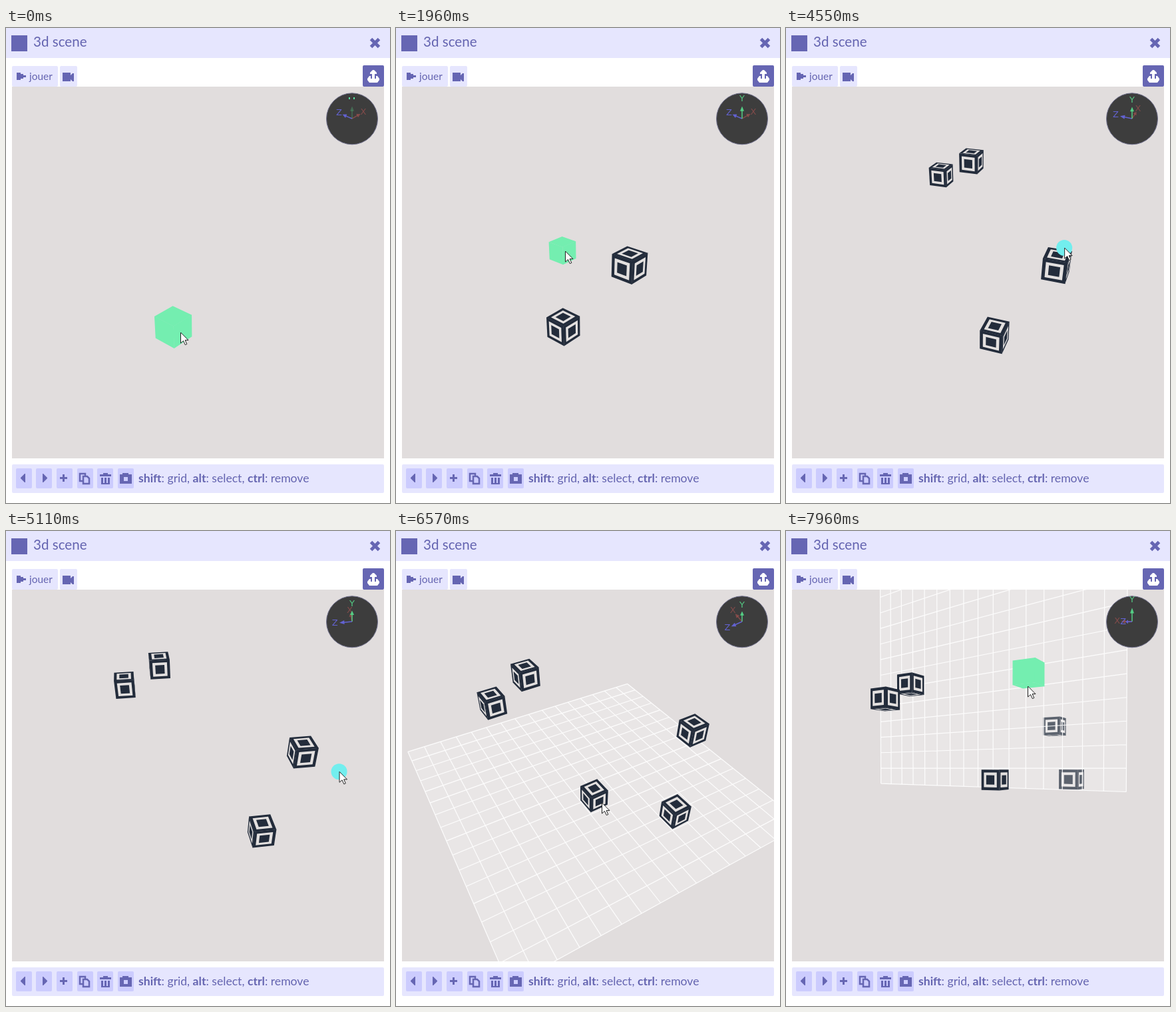
An HTML page with a canvas for the animation above (8000 ms loop, 577 by 713 pixels).

```html
<!DOCTYPE html>
<html lang="en">
<head>
<meta charset="utf-8">
<title>3d scene</title>
<style>
  html, body { margin: 0; width: 100%; height: 100%; overflow: hidden; background: #fff; }
  svg, canvas { position: absolute; left: 0; top: 0; width: 577px; height: 713px; }
  text { font-family: Lato, "Open Sans", sans-serif; fill: #6464b0; }
  .bar { fill: #e6e6fe; }
  .key { fill: #ccccfe; }
  .ink { fill: #6666b3; }
  .line { fill: none; stroke: #6666b3; stroke-width: 2.5; }
  .white { fill: #fff; }
</style>
</head>
<body>
<svg viewBox="0 0 577 713">
  <rect class="bar" width="577" height="45"/>
  <rect class="ink" x="8" y="11" width="24" height="24"/>
  <text x="41" y="28" font-size="20.6">3d scene</text>
  <path class="line" style="stroke-width:5" d="M548.5 16.500l12 12m0-12l-12 12"/>

  <rect class="bar" x="9" y="57" width="69" height="31" rx="2"/>
  <path class="ink" d="M16 67h6v2h4v2h4v3h-4v2h-4v2h-6z"/>
  <text x="35" y="77.500" font-size="15.4">jouer</text>
  <rect class="bar" x="81" y="57" width="26" height="31" rx="2"/>
  <path class="ink" d="M85 67h12v4l3-3h2v12h-2l-3-3v3h-12z"/>
  <rect class="ink" x="536" y="56" width="32" height="32" rx="2"/>
  <path class="white" d="M551 63h2l4 4v2h-3v7h2v-4h2l3 4v2l-3 4h-12l-3-4v-2l3-4h2v4h2v-7h-3v-2z"/>

  <rect class="bar" x="9" y="655" width="559" height="43" rx="2"/>
  <g id="keys"></g>
  <path class="ink" d="M22 675l6-6h1v13h-1l-6-6zM62 675l-6-6h-1v13h1l6-6z"/>
  <path class="ink" d="M85 670h3v4h4v3h-4v4h-3v-4h-4v-3h4z"/>
  <path class="line" d="M115 680h-4v-11h8v3M116 673h6l3 3v8h-9z"/>
  <path class="ink" d="M141 670h5v-2h7v2h5v3h-17zM143 675h3v10h-3zM148 675h3v10h-3zM153 675h3v10h-3zM143 683h13v2h-13z"/>
  <path class="ink" fill-rule="evenodd" d="M171 670h4v-2h9v2h5v14h-18zM177 674v6h6v-6z"/>
  <text x="199" y="681.500" font-size="17.6"><tspan font-weight="700">shift</tspan>: grid, <tspan font-weight="700">alt</tspan>: select, <tspan font-weight="700">ctrl</tspan>: remove</text>
</svg>
<canvas id="stage" width="577" height="713"></canvas>
<script>
const LOOP = 8000, FOCAL = 660, DIST = 24, RAD = Math.PI / 180, LATTICE = -41;
const ctx = document.getElementById('stage').getContext('2d');

document.getElementById('keys').innerHTML = [15, 45, 76, 107, 137, 168]
  .map(x => `<rect class="key" x="${x}" y="661" width="24" height="30" rx="2"/>`).join('');

// world points: [right, up, away] around the orbit target
const cubes = [
  { at: 900, p: [-1.1, -0.2, -4.95] },
  { at: 1460, p: [1.72, 2.9, -5] },
  { at: 2840, p: [-0.4, 3.95, 4.93] },
  { at: 3490, p: [1, 5, 3.6] },
  { at: 6490, p: [-1.2, -0.2, -0.7] }
];
const [c1, c2, c3, c4, c5] = cubes.map(c => c.p);

const grids = [
  { from: 240, to: 1700, p: [-1.45, -0.7, -0.7], angle: -45 },
  { from: 2200, to: 3970, p: [2.75, -0.7, 3.3], angle: -42 },
  { from: 5750, to: 6800, p: [0, -0.7, 0], angle: -43, floor: true },
  { from: 7640, to: 8000, p: [-0.4, -0.6, 0.07], angle: 42 }
];

// [time, yaw, pitch]
const orbit = [[0, 0, 27], [3970, 0, 27], [4550, 21, 32], [5590, 73, 42],
  [6850, 73, 42], [7320, 85, 21], [7640, 100, 1]];

// [time, x, y]
const pointer = [[0, 262, 457], [850, 262, 457], [1300, 362, 366], [1640, 362, 366],
  [1900, 254, 335], [2200, 254, 335], [2600, 288, 234], [2900, 288, 234],
  [3250, 326, 217], [3570, 337, 197], [3900, 362, 312], [4550, 418, 330],
  [5590, 571, 388], [5700, 571, 388], [5900, 389, 382], [6200, 389, 382],
  [6480, 309, 408], [6650, 309, 408], [6850, 318, 318], [7320, 352, 265],
  [7600, 390, 216], [7960, 363, 233]];

const far = [-1.57, -0.2, 3.4], side = [0.8, -0.2, -3.3];
const ghost = [[0, ...c1], [850, ...c1], [1300, ...c2], [1640, ...c2], [1900, ...far],
  [2200, ...far], [2600, ...c3], [2840, ...c3], [3300, ...c4], [5900, ...side],
  [6200, ...side], [6480, ...c5], [7640, -2.9, 3.6, -2], [7900, -2.9, 5, -2]];
const ghostOn = [[0, 1460], [1640, 3490], [5900, 6490], [7640, 8000]];
const dragOn = [[4000, 5600], [6880, 7600]];

const within = (spans, t) => spans.some(([a, b]) => t >= a && t < b);
const dot = (a, b) => a[0] * b[0] + a[1] * b[1] + a[2] * b[2];
const add = (p, v, k) => p.map((n, i) => n + v[i] * k);

function sample(keys, t) {
  let i = 0;
  while (i < keys.length - 1 && keys[i + 1][0] <= t) i++;
  const a = keys[i], b = keys[i + 1];
  if (!b) return a.slice(1);
  const k = (t - a[0]) / (b[0] - a[0]);
  return a.slice(1).map((v, n) => v + (b[n + 1] - v) * k);
}

let view;
function setView(yaw, pitch) {
  const s = Math.sin(pitch * RAD), c = Math.cos(pitch * RAD);
  view = { yaw, s, c, eye: [0, DIST * s, -DIST * c] };
}
function rotate([x, y, z]) {
  const c = Math.cos(view.yaw * RAD), s = Math.sin(view.yaw * RAD);
  return [x * c - z * s, y, x * s + z * c];
}
function axis(angle) {
  const r = (view.yaw + angle) * RAD;
  return [Math.cos(r), 0, Math.sin(r)];
}
const depth = p => DIST + p[2] * view.c - p[1] * view.s;
function project(p) {
  const k = FOCAL / depth(p);
  return [288.5 + p[0] * k, 367 - (p[1] * view.c + p[2] * view.s) * k];
}

function poly(points, color) {
  ctx.beginPath();
  points.forEach(([x, y]) => ctx.lineTo(x, y));
  ctx.closePath();
  ctx.fillStyle = color;
  ctx.fill();
}

function drawCube(c, half, flat) {
  const axes = [axis(LATTICE), [0, 1, 0], axis(LATTICE + 90)];
  axes.forEach((n, i) => [-1, 1].forEach(sign => {
    const mid = add(c, n, sign * half);
    if (dot(n, add(view.eye, mid, -1)) * sign <= 0) return;
    const u = axes[(i + 1) % 3], v = axes[(i + 2) % 3];
    const square = (k, color) => poly([[-1, -1], [1, -1], [1, 1], [-1, 1]]
      .map(([x, y]) => project(add(add(mid, u, x * k * half), v, y * k * half))), color);
    if (flat) return square(1.01, flat);
    square(1.01, '#232c3b');
    square(0.73, '#e3e0df');
    square(0.46, '#232c3b');
  }));
}

function drawGrid(g) {
  const c = rotate(g.p), u = axis(g.angle);
  const v = g.floor ? axis(g.angle + 90) : [0, 1, 0], low = g.floor ? -8 : 0;
  const at = (i, j) => project(add(add(c, u, i - 8), v, j + low));
  poly([at(0, 0), at(16, 0), at(16, 16), at(0, 16)], 'rgba(255,255,255,.26)');
  ctx.beginPath();
  for (let i = 0; i <= 16; i++) {
    ctx.moveTo(...at(i, 0)); ctx.lineTo(...at(i, 16));
    ctx.moveTo(...at(0, i)); ctx.lineTo(...at(16, i));
  }
  ctx.strokeStyle = 'rgba(255,255,255,.9)';
  ctx.lineWidth = 1.2;
  ctx.stroke();
}

function isBehind(p, g) {
  if (g.floor) return false;
  const c = rotate(g.p), n = axis(g.angle + 90);
  const facing = Math.sign(dot(n, add(view.eye, c, -1)));
  return dot(n, add(p, c, -1)) * facing < -0.6;
}

function drawGizmo(t) {
  const ox = 520, oy = 136;
  ctx.beginPath();
  ctx.arc(ox, oy + 0.3, 38.5, 0, 7);
  ctx.fillStyle = '#3d3d3d';
  ctx.fill();
  ctx.strokeStyle = '#6f6f8c';
  ctx.lineWidth = 1;
  ctx.stroke();
  const dimY = t < 1640 || (t > 2440 && t < 4300);
  const arms = [
    ['X', axis(LATTICE + 90), '#c85a58'],
    ['Y', [0, 1, 0], '#55d488'],
    ['Z', axis(LATTICE + 180), '#6464d8']
  ].sort((a, b) => b[1][2] - a[1][2]);
  ctx.font = '13px "DejaVu Sans", sans-serif';
  ctx.textAlign = 'center';
  ctx.textBaseline = 'middle';
  for (const [name, d, color] of arms) {
    const dx = d[0] * 26, dy = -(d[1] * view.c + d[2] * view.s) * 28;
    const len = Math.hypot(dx, dy) || 1, nx = -dy / len * 3, ny = dx / len * 3;
    const faded = name === 'Y' && dimY;
    ctx.globalAlpha = faded ? 0.3 : d[2] > 0.3 && name === 'X' ? 0.5 : 0.95;
    ctx.strokeStyle = ctx.fillStyle = color;
    ctx.lineWidth = 1.5;
    ctx.beginPath();
    ctx.moveTo(ox, oy);
    ctx.lineTo(ox + dx * 0.5, oy + dy * 0.5);
    ctx.stroke();
    const bx = ox + dx * 0.45, by = oy + dy * 0.45;
    poly([[bx + nx, by + ny], [bx - nx, by - ny], [ox + dx * 0.74, oy + dy * 0.74]], color);
    if (faded) {
      ctx.globalAlpha = 1;
      ctx.fillStyle = '#55e0a0';
      ctx.fillRect(515, 104, 2, 3);
      ctx.fillRect(522, 104, 2, 3);
    } else ctx.fillText(name, ox + dx, oy + dy - d[1] * 4);
  }
  ctx.globalAlpha = 1;
}

const arrow = new Path2D('M0 0V16L4 12.500L6.800 18.600L9.300 17.500L6.600 11.600H11.500Z');
function drawPointer(t) {
  const [x, y] = sample(pointer, t);
  if (within(dragOn, t)) {
    ctx.beginPath();
    ctx.arc(x, y, 12, 0, 7);
    ctx.fillStyle = '#72eeee';
    ctx.fill();
  }
  ctx.save();
  ctx.translate(x + 0.5, y);
  ctx.fillStyle = '#fff';
  ctx.strokeStyle = '#222';
  ctx.lineWidth = 1;
  ctx.fill(arrow);
  ctx.stroke(arrow);
  ctx.restore();
}

function draw(t) {
  setView(...sample(orbit, t));
  ctx.clearRect(0, 0, 577, 713);
  ctx.save();
  ctx.beginPath();
  ctx.rect(9, 88, 559, 558);
  ctx.clip();
  ctx.fillStyle = '#e1dddd';
  ctx.fillRect(9, 88, 559, 558);

  const items = cubes.filter(c => t >= c.at).map(c => ({ p: rotate(c.p), half: 0.52 }));
  if (within(ghostOn, t)) items.push({ p: rotate(sample(ghost, t)), half: 0.58, flat: '#74eeb0' });
  items.sort((a, b) => depth(b.p) - depth(a.p));
  const grid = grids.find(g => t >= g.from && t < g.to);
  const paint = list => list.forEach(c => drawCube(c.p, c.half, c.flat));
  const hidden = items.filter(c => grid && !c.flat && isBehind(c.p, grid));
  paint(hidden);
  if (grid) drawGrid(grid);
  paint(items.filter(c => !hidden.includes(c)));
  drawGizmo(t);
  ctx.restore();
  drawPointer(t);
}

const start = performance.now();
function tick(now) {
  draw(Math.max(0, now - start) % LOOP);
  requestAnimationFrame(tick);
}
draw(0);
requestAnimationFrame(tick);
</script>
</body>
</html>
```
